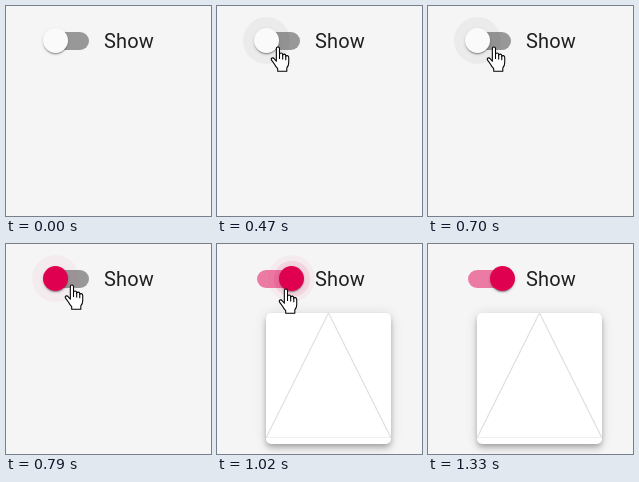
Write an HTML page that moves like this. It is 205x210 px and loops after 1.79 s.

```html
<!DOCTYPE html>
<html lang="en">
<head>
<meta charset="utf-8">
<title>Fade switch</title>
<style>
  html, body { margin: 0; width: 100%; height: 100%; overflow: hidden; background: #f5f5f5; }
  #stage { position: relative; width: 205px; height: 210px; overflow: hidden; --accent: #e00050; }
  #stage > * { position: absolute; }
  #track { left: 40px; top: 26.25px; width: 43px; height: 17.5px; border-radius: 9px; }
  #halo, #ripple { left: 25.75px; top: 10.75px; width: 47.5px; height: 47.5px; border-radius: 50%; }
  #ripple { background: var(--accent); }
  #thumb {
    left: 37px; top: 22px; width: 25px; height: 25px; border-radius: 50%;
    box-shadow: 0 2.5px 1.25px -1.25px rgba(0,0,0,.2), 0 1.25px 1.25px rgba(0,0,0,.14), 0 1.25px 3.75px rgba(0,0,0,.12);
  }
  #label { left: 98px; top: 20px; font: 20px/30px Roboto, sans-serif; letter-spacing: .19px; color: rgba(0,0,0,.87); }
  #paper {
    left: 49px; top: 69px; width: 125px; height: 131px; border-radius: 5px; background: #fff;
    box-shadow: 0 2.5px 5px -1.25px rgba(0,0,0,.2), 0 5px 6.25px rgba(0,0,0,.14), 0 1.25px 12.5px rgba(0,0,0,.12);
  }
  #paper svg { display: block; width: 125px; height: 125px; }
  #cursor { left: 0; top: 0; width: 20px; height: 26px; overflow: visible; }
  #cursor path { fill: #fff; stroke: #000; stroke-linejoin: round; stroke-linecap: round; }
</style>
</head>
<body>
<div id="stage">
  <div id="track"></div>
  <div id="halo"></div>
  <div id="thumb"></div>
  <div id="ripple"></div>
  <div id="label">Show</div>
  <div id="paper">
    <svg viewBox="0 0 100 100"><path d="M0 100L50 0L100 100Z" fill="#fff" stroke="#000" stroke-opacity=".12"/></svg>
  </div>
  <svg id="cursor">
    <path id="arrow" d="M.5 .5V16.6L4.2 13.1L6.9 19L9.3 18L6.7 12.1H11.8Z"/>
    <g id="hand" transform="translate(-6.5 -.6) scale(1.06)">
      <path d="M5.5 14V2.2Q5.5 .5 7 .5T8.5 2.2V7.5Q8.6 6.3 10 6.3T11.5 7.8V8.5Q11.8 7.2 13 7.3T14.4 8.8V9.6Q14.8 8.5 15.9 8.7T17.2 10.3V15.5Q17.2 18 15.4 20.3V23.5H6.8V21Q5.2 19.5 3.8 16.8L1 13Q.2 11.6 1.4 11T3.6 11.8Z"/>
      <path d="M8.5 7.5V11.5M11.5 8.5V12M14.4 9.6V12.5"/>
    </g>
  </svg>
</div>
<script>
const LOOP = 1790, STEP = 78.2, LAST_STEP = 17, LEAD = 11;
const HOVER_IN = 325, HOVER_OUT = 1025, PRESS = 750, TOGGLE = 780;

// the pointer's way: enter, reach the switch, drift, leave
const route = [
  { t: 70, x: 102, y: 138 },
  { t: 235, x: 56, y: 68 },
  { t: 470, x: 60, y: 41 },
  { t: 625, x: 64, y: 40 },
  { t: 1015, x: 67, y: 43 },
  { t: 1095, x: 102, y: 129 },
  { t: 1255, x: 138, y: 182 },
];

const $ = id => document.getElementById(id);
const clamp = v => Math.min(1, Math.max(0, v));
const progress = (t, start, length) => ease(clamp((t - start) / length));

// cubic-bezier(.4, 0, .2, 1)
function ease(x) {
  let lo = 0, hi = 1;
  for (let i = 0; i < 20; i++) {
    const s = (lo + hi) / 2, r = 1 - s;
    if (1.2 * r * r * s + .6 * r * s * s + s ** 3 < x) lo = s; else hi = s;
  }
  return 3 * (1 - lo) * lo * lo + lo ** 3;
}

function drawCursor(t) {
  const next = route.findIndex(p => p.t > t);
  const hovering = t > HOVER_IN && t < HOVER_OUT;
  $('cursor').style.display = next > 0 ? '' : 'none';
  $('arrow').style.display = hovering ? 'none' : '';
  $('hand').style.display = hovering ? '' : 'none';
  if (next < 1) return;
  const a = route[next - 1], b = route[next], k = (t - a.t) / (b.t - a.t);
  const mix = axis => Math.round(a[axis] + (b[axis] - a[axis]) * k);
  $('cursor').style.transform = `translate(${mix('x')}px, ${mix('y')}px)`;
}

function draw(t) {
  const on = t >= TOGGLE, slide = progress(t, TOGGLE, 150);
  const shift = `translateX(${25 * slide}px)`;
  const hover = progress(t, HOVER_IN, 140) - progress(t, HOVER_OUT, 150);

  $('track').style.background = `rgba(${224 * slide}, 0, ${80 * slide}, ${.38 + .12 * slide})`;
  $('thumb').style.background = on ? 'var(--accent)' : '#fafafa';
  $('thumb').style.transform = shift;
  $('halo').style.background = on ? 'rgba(224,0,80,.04)' : 'rgba(0,0,0,.04)';
  $('halo').style.opacity = hover;
  $('halo').style.transform = shift;
  $('ripple').style.transform = `${shift} scale(${progress(t, PRESS, 550)})`;
  $('ripple').style.opacity = t < PRESS ? 0 : .3 * (1 - progress(t, TOGGLE, 540));
  $('paper').style.opacity = progress(t, TOGGLE, 225);
  drawCursor(t);
}

const start = performance.now();
function loop() {
  const t = (performance.now() - start) % LOOP;
  draw(STEP * Math.min(LAST_STEP, Math.floor((t + LEAD) / STEP)));
  requestAnimationFrame(loop);
}
loop();
</script>
</body>
</html>
```
